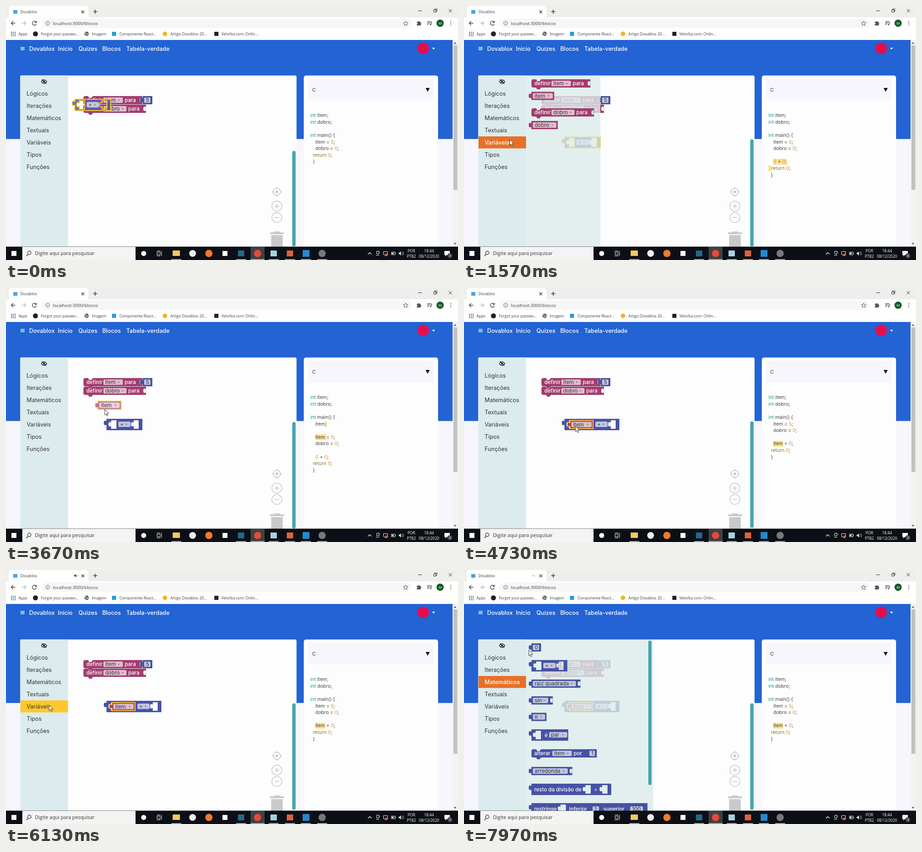
An HTML page with a canvas for the animation above (8 s loop, 998x561 px).

```html
<!DOCTYPE html>
<html lang="pt-BR">
<head>
<meta charset="utf-8">
<title>Dovablox</title>
<style>
html, body { margin: 0; width: 100%; height: 100%; overflow: hidden; background: #f7f6fc; }
canvas { display: block; }
</style>
</head>
<body>
<canvas id="stage" width="998" height="561"></canvas>
<script>
const ctx = document.getElementById('stage').getContext('2d');
const LOOP = 8000;
const PAGE = 'Inter, sans-serif', SYSTEM = '"Open Sans", sans-serif';
const MATH = '#4653a5', VARIABLE = '#a33c70', YELLOW = '#ffc72c', TEAL = '#45a5ae', DARK = '#3c4043';
const CATEGORIES = ['Lógicos', 'Iterações', 'Matemáticos', 'Textuais', 'Variáveis', 'Tipos', 'Funções'];

// Key moments, in ms
const DROP = 700, OPEN_VARS = 1400, GRAB = 3400, SNAP = 4300, OPEN_MATH = 7250;
const POINTER = [
  [0, 168, 216], [DROP, 238, 299], [1250, 101, 296], [1570, 101, 295], [1750, 101, 295],
  [2450, 142, 238], [3100, 164, 207], [GRAB, 164, 207], [3670, 218, 268], [SNAP, 246, 305],
  [5150, 246, 305], [5850, 95, 298], [6250, 95, 298], [6900, 88, 245], [7350, 88, 245], [7960, 143, 177]
];

// Drawing helpers
function rect(x, y, w, h, color, radius = 0) {
  ctx.fillStyle = color;
  ctx.beginPath();
  ctx.roundRect(x, y, w, h, radius);
  ctx.fill();
}
function circle(x, y, r, color, lineWidth) {
  ctx.beginPath();
  ctx.arc(x, y, r, 0, 7);
  ctx.fillStyle = ctx.strokeStyle = color;
  ctx.lineWidth = lineWidth || 1;
  lineWidth ? ctx.stroke() : ctx.fill();
}
function stroke(d, color, width = 1) {
  ctx.strokeStyle = color;
  ctx.lineWidth = width;
  ctx.stroke(new Path2D(d));
}
function fill(d, color) {
  ctx.fillStyle = color;
  ctx.fill(new Path2D(d));
}
function text(s, x, cy, size, color, { font = PAGE, weight = 400, align = 'left' } = {}) {
  ctx.font = `${weight} ${size}px ${font}`;
  ctx.textAlign = align;
  ctx.fillStyle = color;
  ctx.fillText(s, x, cy + size * .36);
}
const ui = (s, x, cy, size, color = DARK, align) => text(s, x, cy, size, color, { font: SYSTEM, align });
const caret = (x, y, r, color) => fill(`M${x - r} ${y - r / 2}h${2 * r}l${-r} ${r * 1.2}z`, color);

// Blocks
const valuePath = (x, y, w, h) => `M${x} ${y}h${w}v${h}h${-w}V${y + 13}q-6 3-6-4t6-4z`;
const statementPath = (x, y, w, h) =>
  `M${x} ${y + 4}q0-4 4-4h6l3 4h5l3-4H${x + w}v${h}H${x + 21}l-3 4h-5l-3-4h-6q-4 0-4-4z`;

function block(x, y, w, h, { color = MATH, shape = valuePath, holes = [], socket, glow, alpha = 1 } = {}) {
  let d = shape(x, y, w, h);
  for (const [dx, dw] of holes) d += valuePath(x + dx, y + 3, dw, h - 6);
  if (socket) d += `M${x + w} ${y + 13}q-6 3-6-4t6-4z`;
  const path = new Path2D(d);
  ctx.globalAlpha = alpha;
  ctx.fillStyle = color;
  ctx.fill(path, 'evenodd');
  ctx.globalAlpha = 1;
  ctx.strokeStyle = glow ? YELLOW : 'rgba(20,20,60,.12)';
  ctx.lineWidth = glow ? 2 : 1;
  ctx.stroke(path);
}
function field(x, y, w, label, arrow = true) {
  rect(x, y, w, 12, 'rgba(255,255,255,.66)', 2.5);
  text(label, x + 4, y + 6, 11.6, '#333');
  if (arrow) caret(x + w - 9, y + 6, 2, '#666');
}
const label = (s, x, cy) => text(s, x, cy, 11.6, '#fff', { weight: 500 });

function number(x, y, value, w = 21) {
  block(x, y, w, 18);
  field(x + 3, y + 3, w - 7, value, false);
}
function variable(x, y, name, w, style) {
  block(x, y, w, 18, { color: VARIABLE, ...style });
  field(x + 3, y + 3, w - 6, name);
}
function setter(x, y, name, fieldWidth) {
  block(x, y, fieldWidth + 87, 18, { color: VARIABLE, shape: statementPath, socket: true });
  label('definir', x + 6.5, y + 9);
  field(x + 44, y + 3, fieldWidth, name);
  label('para', x + fieldWidth + 48, y + 9);
}
function dropdown(x, y, w, name, socket) {
  block(x, y, w, 18, { socket });
  field(x + 3, y + 3, w - (socket ? 13 : 6), name);
}
function sum(x, y, { left = 12, glow, alpha } = {}) {
  block(x, y, left + 67, 25, { holes: [[10, left], [left + 48, 11]], glow, alpha });
  field(x + left + 14, y + 6, 27, '+');
}

// Flyouts
function variableBlocks() {
  setter(149, 162, 'item', 43);
  variable(149, 189.5, 'item', 50);
  setter(149, 226, 'dobro', 51);
  variable(149, 254, 'dobro', 58);
}
function mathBlocks() {
  number(149, 162, '0');
  sum(149, 199);
  dropdown(149, 242, 108, 'raiz quadrada', true);
  dropdown(149, 279, 47, 'sin', true);
  dropdown(149, 315.5, 33, 'π');
  block(149, 352, 81, 25, { holes: [[9, 12]] });
  label('é', 178, 364.5);
  field(188, 358, 40, 'par');
  block(149, 396, 144, 18, { shape: statementPath });
  label('alterar', 155, 405);
  field(195, 399, 43, 'item');
  label('por', 242, 405);
  number(274, 396, '1', 19);
  dropdown(149, 435, 90, 'arredonda', true);
  block(149, 472, 176, 25, { holes: [[119, 12], [156, 12]] });
  label('resto da divisão de', 155, 484.5);
  label('÷', 287, 484.5);
  block(149, 515, 256, 25, { holes: [[64, 12]] });
  label('restringe', 155, 528);
  label('inferior', 232, 528);
  number(281, 519, '1');
  label('superior', 308, 528);
  number(364, 519, '100', 35);
  rect(407, 156, 7, 319, TEAL, 3);
}
function flyout(right, drawBlocks) {
  rect(137, 154, right - 137, 377, 'rgba(221,237,236,.8)');
  drawBlocks();
}

// Generated code: leading spaces indent, square brackets mark changed text
const HEAD = ['int item;', 'int dobro;', '', 'int main() {'];
const TAIL = [' return 0;', ' }'];
const BODY = ['  item = 5;', '  dobro = 0;'];
function codeLines(t) {
  if (t < 100) return [...HEAD, ...BODY, ...TAIL];
  if (t < GRAB) return [...HEAD, ...BODY, '', '  [0 + 0;]', '[  ]return 0;', ' }'];
  if (t < SNAP) return [...HEAD, '  item[;]', '', '  [item ]= 5;', BODY[1], '', '  0 + 0;', ...TAIL];
  return [...HEAD, ...BODY, '', '  [item] + 0;', ...TAIL];
}
function codeColor(token) {
  if (token === 'int') return '#169a9a';
  if (token === 'return') return '#77801c';
  return /^\d/.test(token) ? '#e48b22' : '#444';
}
function drawCode(t) {
  codeLines(t).forEach((line, row) => {
    const body = line.trimStart(), y = 241.3 + row * 14.6;
    let x = 672 + (line.length - body.length) * 5.5, marked = false;
    for (const token of body.split(/(\[|\]|\bint\b|return|\d+)/)) {
      if (token === '[' || token === ']') { marked = token === '['; continue; }
      ctx.font = `400 10.6px ${PAGE}`;
      const w = ctx.measureText(token).width;
      if (marked) rect(x, y - 6, w, 13, '#ffe28f');
      text(token, x, y, 10.6, codeColor(token));
      x += w;
    }
  });
}

function drawBrowser(t) {
  rect(0, 0, 998, 26, '#eeefec');
  rect(0, 25, 998, 50, '#fefefe');
  rect(6, 0, 176, 30, '#fefefe', 6);
  rect(16, 9, 9, 8, '#4aa3e0');
  ui('Dovablox', 32, 12.5, 8.4);
  if (t > 5100) {
    const tone = t < 7850 ? '#555' : '#ddd';
    fill('M150 11h2l3-2v7l-3-2h-2z', tone);
    stroke('M156.5 10.5q2 2 0 4', tone);
  }
  stroke('M166.500 10l6 6m0-6l-6 6', '#333', 1.3);
  stroke('M192.500 12.500h9m-4.500-4.500v9', '#333', 1.4);
  stroke('M910 10.500h8M977.500 7l7 7m0-7l-7 7M944.500 8.500h5v5h-5zM946.500 8v-1.500h5v5h-2', '#222');
  stroke('M20.500 38h-9m4.500-4.500l-4.500 4.500 4.500 4.500', '#444', 1.4);
  stroke('M35 38h9m-4.500-4.500l4.500 4.500-4.500 4.500', '#bbb', 1.4);
  stroke('M66.500 35.500a4.500 4.500 0 1 0 .5 4M67 33v3.500h-3.500', '#444', 1.4);
  rect(79, 28, 816, 20, '#f5f6f6', 10);
  circle(92, 38, 4.3, '#5f6368', 1);
  stroke('M92 37.500v3M92 35.300v1.200', '#5f6368');
  ui('localhost:3000/blocos', 103.500, 38, 9.8);
  stroke('M882.500 33l1.500 3.400 3.700.4-2.800 2.500.8 3.700-3.200-1.900-3.200 1.900.8-3.700-2.800-2.500 3.700-.4z', '#555');
  fill('M907 35h2.500a1.800 1.800 0 0 1 3.500 0h2.500v2.500a1.800 1.800 0 0 1 0 3.500v2h-8.500v-2.500a1.700 1.700 0 0 0 0-3.500z', '#555');
  stroke('M930 34.500h9M930 37.500h6M930 40.500h4M938.500 41v-4.500h2.500', '#555', 1.3);
  circle(937.500, 41, 1.6, '#555');
  circle(958.5, 38, 8, '#145c25');
  ui('M', 958.5, 38, 8, '#fff', 'center');
  for (const y of [34, 38, 42]) circle(982, y, 1.1, '#555');

  const appColors = ['#e34133', '#34a853', '#4285f4'];
  for (let i = 0; i < 9; i++) rect(11 + i % 3 * 4, 57 + (i / 3 | 0) * 3.7, 2.4, 2.4, appColors[i % 3]);
  circle(65, 61.5, 5.5, '#222');
  circle(178, 61.5, 5, '#5f6368');
  stroke('M173 60h4l2 3 4-1M176 66l1-3', '#fff');
  rect(234, 57, 9, 9, '#2b9bd8');
  circle(351, 61.5, 5, '#f0b51c');
  rect(460, 57, 9, 9, '#222');
  const bookmarks = [['Apps', 27.5], ['Forgot your passwo...', 77], ['Imagem', 189.5],
    ['Componente React...', 250.5], ['Artigo Dovablox 20...', 363], ['Velorba.com: Onlin...', 475.5]];
  for (const [name, x] of bookmarks) ui(name, x, 61.5, 8.4);
}

function drawPage() {
  rect(0, 75, 986, 457, '#f7f6fc');
  rect(0, 75, 986, 218.7, '#2363d3');
  rect(32, 90, 9, 8, '#79bdf0');
  const links = [['Dovablox', 51], ['Início', 114.5], ['Quizes', 160], ['Blocos', 212.5], ['Tabela-verdade', 265.5]];
  for (const [name, x] of links) text(name, x, 94, 12.7, '#fff', { weight: 500 });
  circle(921, 93.500, 12.6, '#e60d4d');
  caret(944, 94, 3.3, '#fff');

  rect(31.5, 153.6, 610, 378, '#fdfdfd', [3, 3, 0, 0]);
  rect(657.5, 153.6, 296.5, 378, '#fdfdfd', [5, 5, 0, 0]);
  rect(668, 161, 276, 48, '#f7f6fd');
  text('C', 676, 185, 11, '#333');
  fill('M926.500 181h9l-4.500 8.5z', '#111');

  rect(986, 75, 12, 457, '#f3f3f3');
  rect(988, 87, 8.5, 319, '#c1c1c1');
  fill('M988.500 83.500h6l-3-3.500zM988.500 523.500h6l-3 3.500z', '#555');
}

function drawToolbox(pointer, selected) {
  rect(31.5, 153.6, 105.5, 377.4, '#dcebed');
  stroke('M78 167q6-8 12 0q-6 8-12 0', '#222', 1.5);
  circle(84, 167, 2.2, '#222');
  stroke('M79 162l10 10', '#222', 1.5);
  const inside = pointer.x > 32 && pointer.x < 137;
  CATEGORIES.forEach((name, i) => {
    const top = 180 + i * 27, hover = inside && pointer.y >= top && pointer.y < top + 27;
    const active = i === selected;
    if (active || hover) rect(32, top + 8 - 8, 105, 26.5, active ? '#e87025' : YELLOW);
    text(name, 45.5, top + 13.3, 12.6, active ? '#fff' : '#333', { weight: active ? 500 : 400 });
  });
}

function drawControls(t) {
  const gray = '#c9c9c9';
  circle(598, 410.500, 8, gray, 1.6);
  circle(598, 410.500, 3, gray);
  stroke('M598 400v4M598 417v4M587.500 410.500h4M604.500 410.500h4', gray, 2);
  for (const y of [442, 467]) {
    circle(598, y, 11, gray, 1.5);
    stroke(`M593 ${y}h10`, gray, 1.7);
  }
  stroke('M598 437v10', gray, 1.7);
  rect(583, 500, 30.500, 4, gray);
  rect(591, 498, 14, 3, gray);
  rect(585.500, 506, 25.500, 26, gray);
  const top = t < DROP ? 320 : t >= GRAB && t < SNAP ? 296 : 294.5;
  rect(632, top, 7.500, (t < SNAP ? 531 : 529.5) - top, TEAL, 3.5);
}

function drawTaskbar() {
  rect(0, 531.500, 998, 30, '#0c1016');
  rect(12, 541, 11, 11, '#fff');
  rect(36, 532, 250, 29, '#f4f4f4');
  circle(51.500, 545, 3.8, '#222', 1.2);
  stroke('M49 548l-4 4.500', '#222', 1.3);
  ui('Digite aqui para pesquisar', 64, 546.5, 10.8, '#333');
  rect(540, 532, 31, 29, '#3d4144');
  circle(304, 546.5, 5.5, '#fff');
  stroke('M333.500 543.500h7v6h-7zM333 541h8M333 552h8M343.500 541v11', '#eee');
  rect(368, 540, 16, 12, '#f6c95c');
  circle(412, 546.500, 7.5, '#eee');
  circle(448, 546.500, 8, '#f5792a');
  rect(478, 541, 11, 11, '#fff');
  rect(512, 540, 14, 13, '#25678d');
  circle(555.500, 546.500, 8, '#e5493a');
  rect(584, 540, 14, 13, '#a5d3e3');
  rect(620, 540, 14, 13, '#e0623c');
  rect(655, 539, 15, 15, '#2489cf');
  circle(698, 546.500, 8, '#77797d');
  for (const x of [376, 519, 591, 627, 662, 698]) rect(x - 11, 559, 22, 2, '#76b9ed');
  rect(540, 559, 31, 2, '#76b9ed');

  stroke('M799 548.500l4-4 4 4', '#fff', 1.2);
  stroke('M818.500 541.500h5v6h-5zM817 550.500h7M824 544h2M833.500 542.500h9v6.500h-9zM836 551.500h5M851 543.500h8v6h-8zM860 545v3', '#eee');
  circle(841, 549, 2.5, '#e2683b');
  rect(852, 545, 4, 3, '#eee');
  fill('M867 545h2l3-3v9l-3-3h-2z', '#eee');
  stroke('M874 543.500q2.500 3 0 6M876 542q4 4.500 0 9', '#bbb');
  ui('POR', 895, 540.5, 8.4, '#fff', 'center');
  ui('PTB2', 895, 552.5, 8.4, '#fff', 'center');
  ui('18:44', 934, 540.5, 8.4, '#fff', 'center');
  ui('08/12/2020', 934, 552.5, 8.4, '#fff', 'center');
  fill('M968 541h12v9h-7l-3 3v-3h-2z', '#fff');
  circle(980, 551.500, 5.5, '#42464a');
  ui('3', 980, 551.5, 8, '#fff', 'center');
}

function drawPointer({ x, y }) {
  const d = `M${x} ${y}v12.500l2.900-2.700 2 4.700 2-.9-2-4.500h4z`;
  fill(d, '#fff');
  stroke(d, '#222', .9);
}

function pointerAt(t) {
  const next = POINTER.findIndex(key => key[0] > t);
  if (next < 0) return { x: 143, y: 177 };
  const [t0, x0, y0] = POINTER[next - 1], [t1, x1, y1] = POINTER[next];
  const u = (t - t0) / (t1 - t0), e = u * u * (3 - 2 * u);
  return { x: x0 + (x1 - x0) * e, y: y0 + (y1 - y0) * e };
}

function drawWorkspace(t, pointer) {
  setter(171, 199, 'item', 43);
  number(302, 199, '5');
  setter(171, 218, 'dobro', 51);
  if (t < DROP) sum(pointer.x - 16, pointer.y - 10, { glow: true, alpha: .8 });
  else sum(222, 289, { left: t < SNAP ? 12 : 54, glow: t < GRAB });
  if (t >= SNAP) variable(234, 292.5, 'item', 51, { glow: true });
  else if (t >= GRAB) variable(pointer.x - 15, pointer.y - 18, 'item', 51, { glow: true, alpha: .7 });
}

function draw() {
  const t = performance.now() % LOOP;
  const pointer = pointerAt(t);
  const varsOpen = t >= OPEN_VARS && t < GRAB, mathOpen = t >= OPEN_MATH;
  drawPage();
  drawControls(t);
  drawToolbox(pointer, varsOpen ? 4 : mathOpen ? 2 : -1);
  drawWorkspace(t, pointer);
  if (varsOpen) flyout(301, variableBlocks);
  if (mathOpen) flyout(418, mathBlocks);
  drawCode(t);
  drawBrowser(t);
  drawTaskbar();
  if (t > 60) drawPointer(pointer);
  requestAnimationFrame(draw);
}
draw();
</script>
</body>
</html>
```
